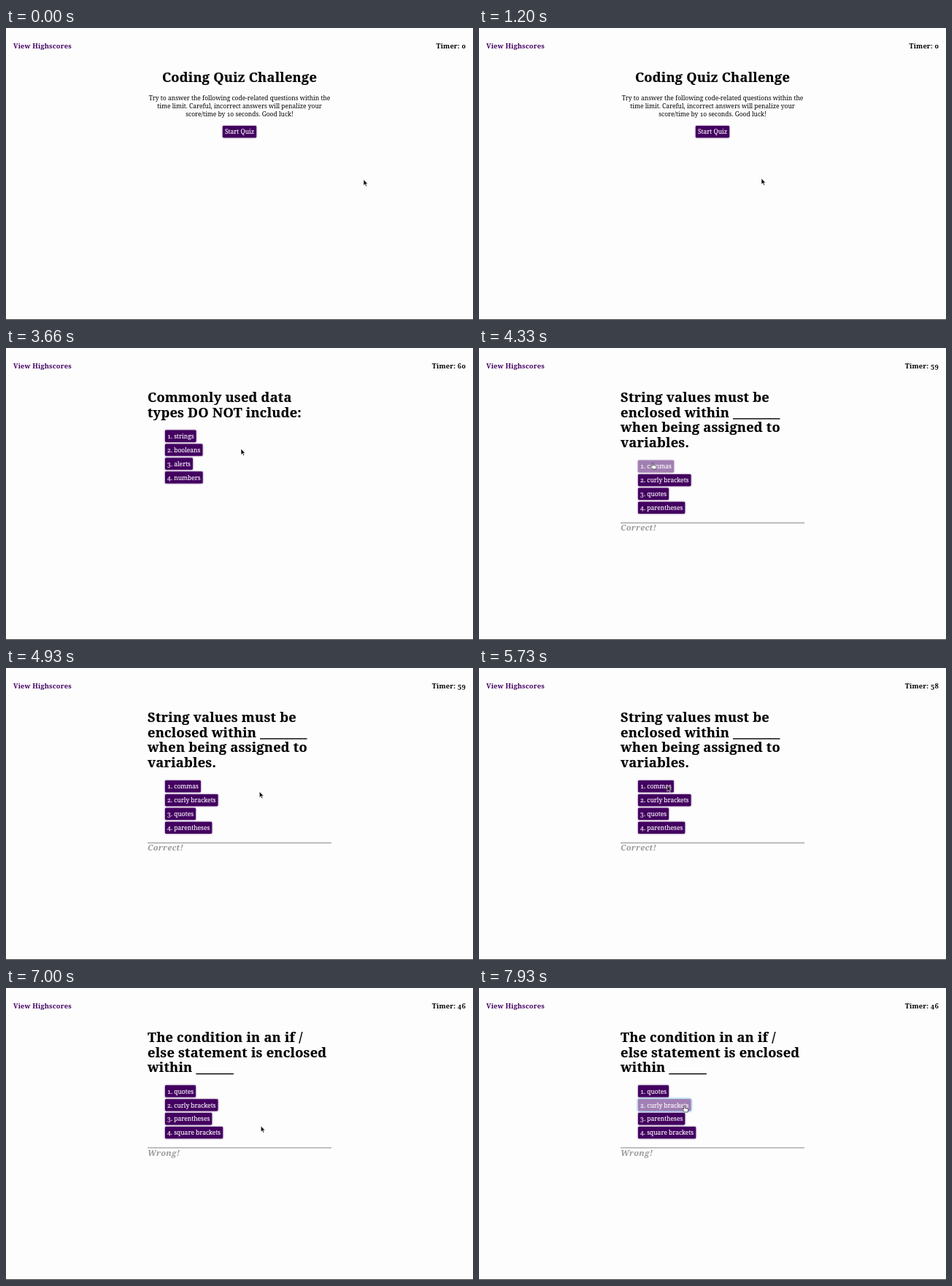
These frames come from a looping animation (640x400 px, 8 s). An HTML page:

```html
<!DOCTYPE html>
<html lang="en">
<head>
<meta charset="utf-8">
<title>Coding Quiz</title>
<style>
  html, body { margin: 0; width: 100%; height: 100%; overflow: hidden; background: #fdfdfd; }
  svg { display: block; width: 640px; height: 400px; }
  text {
    font-family: "Noto Serif", "Liberation Serif", serif;
    font-size: 8.48px;
    font-variant-numeric: oldstyle-nums;
    white-space: pre;
  }
  .head { font-weight: 700; font-size: 9.3px; letter-spacing: .15px; }
  .title { font-weight: 700; font-size: 18.3px; letter-spacing: .2px; stroke: #000; stroke-width: .2px; }
  .note { font-weight: 700; font-style: italic; font-size: 11px; letter-spacing: .3px; fill: #999; }
  .mid { text-anchor: middle; }
  .btn rect { fill: #430060; filter: drop-shadow(.7px .8px .8px #430060b0); }
  .btn text { fill: #fff; stroke: #fff; stroke-width: .12px; }
  .btn.hover rect { fill: #a27fb4; }
  .btn.focus rect { filter: drop-shadow(0 0 1.5px #7fb4e0) drop-shadow(0 0 1px #9cc8ea); }
</style>
</head>
<body>
<svg id="stage" viewBox="0 0 640 400">
  <rect width="640" height="400" fill="#fdfdfd"/>
  <text class="head" x="10" y="28.3" fill="#430060">View Highscores</text>
  <text class="head" id="timer" x="630" y="28.3" text-anchor="end">Timer: 0</text>
  <g id="scenes"></g>
  <rect y="399" width="640" height="1" fill="#3c3c3c"/>
  <g id="cursor">
    <path id="arrow" d="M0 0V8.2L1.9 6.5L3.2 9.4L4.6 8.8L3.3 6H5.8Z" fill="#111" stroke="#fff" stroke-width=".6"/>
    <path id="hand" transform="translate(-2.8 0)" fill="#fff" stroke="#222" stroke-width=".7" stroke-linejoin="round"
      d="M2 .8C2-.2 3.6-.2 3.6 .8V3.6L7.2 4.3C8 4.6 8.1 5.2 8 6L7.3 9H3L.3 5.8C-.3 4.9 .7 4.1 1.4 4.7L2 5.3Z"/>
  </g>
</svg>
<script>
const LOOP = 8000, STEP = 1000 / 15;
const LEFT = 194, BASE = 74, LEADING = 20.7;
const $ = id => document.getElementById(id);

function add(parent, tag, attrs, text) {
  const el = document.createElementNS("http://www.w3.org/2000/svg", tag);
  for (const key in attrs) el.setAttribute(key, attrs[key]);
  if (text) el.textContent = text;
  parent.append(el);
  return el;
}

// The box follows its label; without x it is centred on the stage.
function button(parent, label, y, x) {
  const el = add(parent, "g", { class: "btn" });
  const box = add(el, "rect", { y, rx: 1.4 });
  const text = add(el, "text", { y: y + 11.3 }, label);
  const w = text.getComputedTextLength() + 6, h = 16.3;
  x ??= 320 - w / 2;
  box.setAttribute("x", x);
  box.setAttribute("width", w);
  box.setAttribute("height", h);
  text.setAttribute("x", x + 3);
  return { el, has: (px, py) => px >= x && px <= x + w && py >= y && py <= y + h };
}

function titleLine(parent, line, y) {
  const words = line.replace(/_+$/, "").trimEnd();
  const blanks = (line.match(/_/g) || []).length;
  const text = add(parent, "text", { class: "title", x: LEFT, y }, words);
  if (blanks) {
    const x = LEFT + text.getComputedTextLength() + 4.8;
    add(parent, "rect", { x, y: y + 1.5, width: blanks * 12.9, height: 1.4 });
  }
}

function intro() {
  const g = add($("scenes"), "g", {});
  add(g, "text", { class: "title mid", x: 320, y: BASE }, "Coding Quiz Challenge");
  ["Try to answer the following code-related questions within the",
   "time limit. Careful, incorrect answers will penalize your",
   "score/time by 10 seconds. Good luck!"
  ].forEach((line, i) => add(g, "text", { class: "mid", x: 320, y: 99.4 + i * 10.8 }, line));
  return { g, buttons: [button(g, "Start Quiz", 134)] };
}

function question(lines, answers, note) {
  const g = add($("scenes"), "g", {});
  lines.forEach((line, i) => titleLine(g, line, BASE + i * LEADING));
  const top = BASE - 2.8 + lines.length * LEADING;
  const buttons = answers.map((label, i) => button(g, `${i + 1}. ${label}`, top + i * 18.9, 218));
  if (note) {
    add(g, "rect", { x: LEFT, y: top + 85, width: 252, height: 1.2, fill: "#999" });
    add(g, "text", { class: "note", x: LEFT, y: top + 96.2 }, note);
  }
  return { g, buttons };
}

const scenes = [
  intro(),
  question(["Commonly used data", "types DO NOT include:"],
    ["strings", "booleans", "alerts", "numbers"]),
  question(["String values must be", "enclosed within _____", "when being assigned to", "variables."],
    ["commas", "curly brackets", "quotes", "parentheses"], "Correct!"),
  question(["The condition in an if /", "else statement is enclosed", "within ____"],
    ["quotes", "curly brackets", "parentheses", "square brackets"], "Wrong!")
];

// One click per scene: when, and on which button.
const clicks = [
  { at: 2860, pick: 0 },
  { at: 4260, pick: 2 },
  { at: 5930, pick: 0 },
  { at: 7730, pick: 1 }
];
const PRESS = 60;   // from press to the next scene

const home = { x: 490, y: 207.5 };
const moves = [
  { from: 600, to: 1200, x: 387, y: 206 },
  { from: 1200, to: 1460, x: 335, y: 141 },
  { from: 1460, to: 2060, x: 322, y: 138 },
  { from: 3670, to: 4060, x: 238, y: 157 },
  { from: 4400, to: 4930, x: 347.3, y: 169.3 },
  { from: 5260, to: 5800, x: 254, y: 160.5 },
  { from: 6070, to: 6460, x: 352, y: 190 },
  { from: 6930, to: 7530, x: 281.5, y: 161 }
];

function pointer(t) {
  let { x, y } = home;
  for (const m of moves) {
    const f = Math.min(1, Math.max(0, (t - m.from) / (m.to - m.from)));
    const e = f * f * (3 - 2 * f);
    x += (m.x - x) * e;
    y += (m.y - y) * e;
  }
  return [x, y];
}

function seconds(t) {
  if (t < clicks[0].at + PRESS) return 0;
  const penalty = t >= 7000 ? 10 : 0;   // lands on the tick after the wrong answer
  return 60 - Math.max(0, Math.floor((t - 3000) / 1000)) - penalty;
}

function draw(t) {
  const done = clicks.filter(c => t >= c.at + PRESS).length;
  const now = Math.min(done, scenes.length - 1);
  const { at, pick } = clicks[now];
  const [x, y] = pointer(t);
  const [hx, hy] = pointer(t - STEP);   // hover trails the pointer
  let over = clicks.some(c => t >= c.at && t < c.at + 330);

  scenes.forEach((s, i) => s.g.style.display = i === now ? "" : "none");
  scenes[now].buttons.forEach((b, i) => {
    const hit = b.has(hx, hy);
    b.el.classList.toggle("hover", hit);
    b.el.classList.toggle("focus", i === pick && t >= at);
    over = over || hit;
  });

  $("timer").textContent = "Timer: " + seconds(t);
  $("cursor").setAttribute("transform", `translate(${x} ${y})`);
  $("hand").style.display = over ? "" : "none";
  $("arrow").style.display = over ? "none" : "";
}

const t0 = performance.now();
function frame() {
  const t = (performance.now() - t0) % LOOP;
  draw(Math.floor((t + 7) / STEP) * STEP + 1);
  requestAnimationFrame(frame);
}
frame();
</script>
</body>
</html>
```
